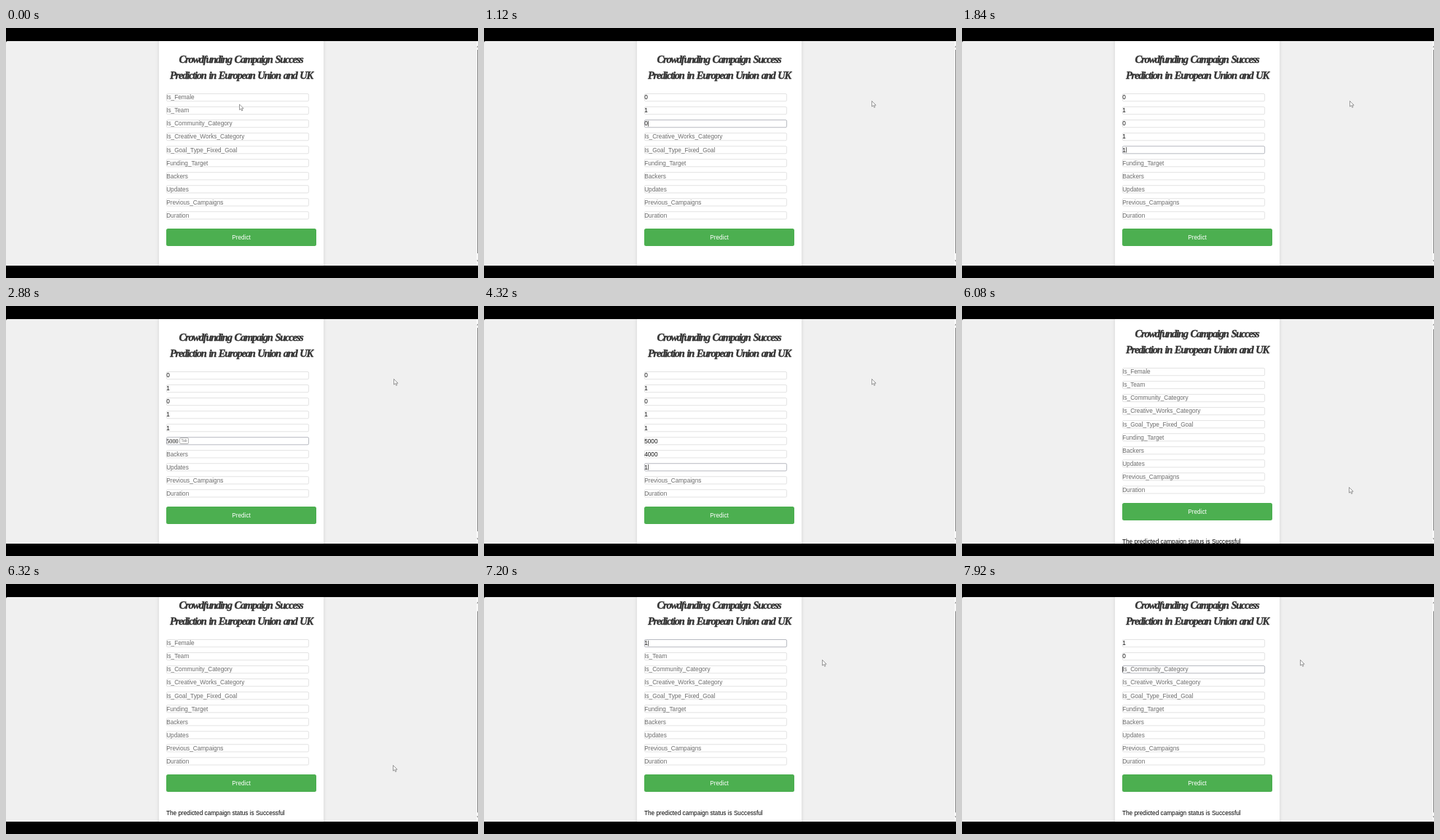
These frames come from a looping animation (648x344 px, 8000 ms). An HTML page:

```html
<!DOCTYPE html>
<html lang="en">
<head>
<meta charset="utf-8">
<title>Campaign prediction form</title>
<style>
  html, body { margin: 0; width: 100%; height: 100%; overflow: hidden; background: #000; }
  svg { display: block; width: 648px; height: 344px; }
  text { font: 8.23px "Liberation Sans", Arial, sans-serif; white-space: pre; }
  .title {
    font: italic bold 14.5px "Liberation Serif", serif;
    letter-spacing: -1.24px; word-spacing: 1.4px; text-anchor: middle;
    fill: #333; stroke: #333; stroke-width: .4px; stroke-linejoin: round;
  }
  .chip text { font-size: 5px; fill: #777; text-anchor: middle; }
</style>
</head>
<body>
<svg viewBox="0 0 648 344">
  <defs>
    <clipPath id="view"><rect y="18" width="648" height="309"/></clipPath>
    <filter id="soft" x="-20%" width="140%"><feGaussianBlur stdDeviation="2.6"/></filter>
  </defs>
  <rect width="648" height="344"/>
  <g clip-path="url(#view)">
    <rect y="18" width="648" height="320" rx="2" fill="#f0f0f0"/>
    <rect x="210" y="0" width="226" height="344" fill="#000" opacity=".12" filter="url(#soft)"/>
    <rect x="210" y="0" width="226" height="344" fill="#fff"/>
    <g id="page">
      <text class="title" x="322.5" y="48">Crowdfunding Campaign Success</text>
      <text class="title" x="323" y="69.6">Prediction in European Union and UK</text>
      <g id="fields"></g>
      <rect x="220" y="276" width="206" height="24" rx="2.5" fill="#4caf50"/>
      <text x="323" y="290.8" fill="#fff" text-anchor="middle">Predict</text>
      <text id="result" x="220" y="331.8">The predicted campaign status is Successful</text>
      <g id="chip" class="chip">
        <rect x="238.5" y="181.5" width="12" height="8" rx="1.5" fill="#fff" stroke="#999" stroke-width=".7"/>
        <text x="244.5" y="187.3">Tab</text>
      </g>
      <rect id="caret" width=".7" height="7.6" fill="#222"/>
    </g>
    <rect x="646" y="18" width="2" height="309" fill="#fafafa"/>
    <rect id="thumb" x="647" width="1" fill="#858585"/>
    <path d="M646.4 26.5l1-2l1 2zM646.4 319.5l1 2l1-2z" fill="#777"/>
    <path id="cursor" d="M0 0V7.6L1.9 6.1L3.2 8.9L4.4 8.3L3.2 5.7H5.6Z"
      fill="#fff" stroke="#707070" stroke-width=".7" stroke-linejoin="round"/>
  </g>
</svg>
<script>
const LOOP = 8000, STEP = 80, SUBMIT = 5520;
const labels = ['Is_Female', 'Is_Team', 'Is_Community_Category', 'Is_Creative_Works_Category',
  'Is_Goal_Type_Fixed_Goal', 'Funding_Target', 'Backers', 'Updates', 'Previous_Campaigns', 'Duration'];

// time, focused field, its value
const entries = [
  [240, 0, ''], [720, 0, '0'], [880, 1, ''], [960, 1, '1'], [1040, 2, ''], [1120, 2, '0'],
  [1200, 3, ''], [1280, 3, '1'], [1360, 4, ''], [1760, 4, '1'], [1920, 5, ''],
  [2640, 5, '5'], [2720, 5, '50'], [2800, 5, '500'], [2880, 5, '5000'],
  [3040, 6, ''], [3120, 6, '4'], [3200, 6, '40'], [3280, 6, '4000'],
  [3360, 7, ''], [4320, 7, '1'], [4560, 8, ''], [4720, 8, '0'], [5040, 9, ''],
  [5200, 9, '3'], [5280, 9, '30'], [SUBMIT, -1, ''],
  [6640, 0, ''], [7120, 0, '1'], [7280, 1, ''], [7600, 1, '0'], [7840, 2, '']
];
// time, x, y
const pointer = [[0, 320.5, 105], [240, 318, 96], [320, 318, 96], [640, 532.5, 100.5],
  [5600, 532.5, 100.5], [5920, 531.5, 249.5], [6320, 531.5, 249.5], [6640, 350, 80],
  [6720, 350, 80], [6960, 464.5, 104.5]];
// time, offset
const scrolling = [[6000, 0], [6080, 5], [6160, 9], [6240, 12], [6320, 14]];

const $ = id => document.getElementById(id);
const rowY = i => 95.6 + 18.03 * i;

function add(parent, name, attrs) {
  const el = document.createElementNS('http://www.w3.org/2000/svg', name);
  set(el, attrs);
  return parent.appendChild(el);
}

function set(el, attrs) {
  for (const key in attrs) el.setAttribute(key, attrs[key]);
}

const show = (el, on) => set(el, { visibility: on ? 'visible' : 'hidden' });

// eased value of a keyframe track's column
function at(track, t, col, ease = u => u) {
  const next = track.findIndex(k => k[0] > t);
  if (next < 0) return track[track.length - 1][col];
  if (next === 0) return track[0][col];
  const a = track[next - 1], b = track[next];
  return a[col] + (b[col] - a[col]) * ease((t - a[0]) / (b[0] - a[0]));
}

const smooth = u => u * u * (3 - 2 * u);

const rows = labels.map((label, i) => ({
  box: add($('fields'), 'rect', { x: 220.4, y: rowY(i) - 5.1, width: 195.2, height: 10.2,
    rx: 1.6, fill: '#fff', 'stroke-width': .8 }),
  text: add($('fields'), 'text', { x: 220.2, y: rowY(i) + 2.8 })
}));

function formState(t) {
  const state = { values: labels.map(() => ''), focus: -1, since: 0 };
  for (const [time, field, value] of entries) {
    if (time > t) break;
    if (field < 0) state.values.fill('');
    else state.values[field] = value;
    state.focus = field;
    state.since = time;
  }
  return state;
}

function draw(ms) {
  const t = Math.floor((ms % LOOP) / STEP) * STEP;
  const { values, focus, since } = formState(t);
  const suggesting = t >= 2880 && t < 3040;
  const submitted = t >= SUBMIT;
  const scroll = at(scrolling, t, 1);

  rows.forEach(({ box, text }, i) => {
    set(box, { stroke: i === focus ? '#a6a9b2' : '#dcdcdc' });
    text.textContent = values[i] || labels[i];
    set(text, { fill: values[i] ? '#111' : '#6c6c6c' });
    text.style.fontFamily = suggesting && i === focus ? '"Liberation Serif", serif' : '';
  });

  const blinkOn = Math.floor((t - since + 40) / 200) % 2 === 0;
  show($('caret'), focus >= 0 && blinkOn && !suggesting);
  if (focus >= 0) set($('caret'), { x: 220.4 + 4.58 * values[focus].length, y: rowY(focus) - 3.8 });
  show($('chip'), suggesting);
  show($('result'), submitted);

  set($('page'), { transform: `translate(0 ${-scroll})` });
  const top = (submitted ? 29 : 30) + scroll * .6;
  set($('thumb'), { y: top, height: submitted ? 277 : 280 });
  set($('cursor'), { transform: `translate(${at(pointer, t, 1, smooth)} ${at(pointer, t, 2, smooth)})` });
}

const start = performance.now();
function tick(now) {
  draw(Math.max(0, now - start));
  requestAnimationFrame(tick);
}
draw(0);
requestAnimationFrame(tick);
</script>
</body>
</html>
```
